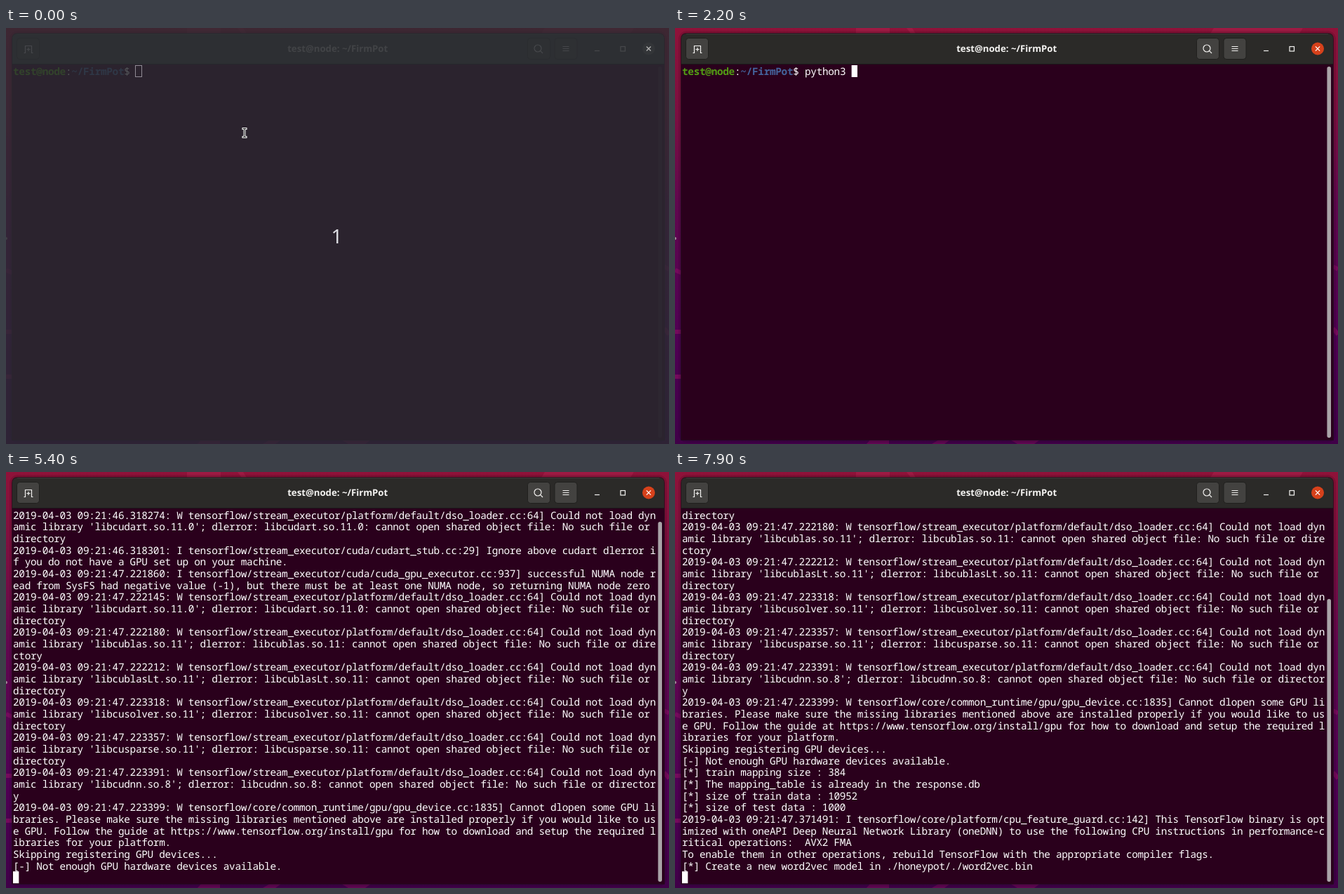
Animation, 945 px wide and 593 px high, one loop 8 s. Source, as an HTML page:

```html
<!DOCTYPE html>
<html lang="en">
<head>
<meta charset="utf-8">
<title>Terminal session</title>
<style>
  html, body { margin: 0; width: 100%; height: 100%; overflow: hidden; background: #2a001c; }
  svg { display: block; width: 945px; height: 593px; }
  text { white-space: pre; text-rendering: geometricPrecision; }
  .mono { font: 14.4px "Noto Sans Mono", "DejaVu Sans Mono", monospace; letter-spacing: -0.307px; fill: #fff; }
  .bold { font-weight: 700; }
  .title { font: 700 13.2px "Noto Sans", "Open Sans", sans-serif; text-anchor: middle; }
  .count { font: 500 28px "Noto Sans", "Open Sans", sans-serif; text-anchor: middle; fill: #dcdce2; }
  .icon { fill: none; stroke-width: 1.2; }
</style>
</head>
<body>
<svg viewBox="0 0 945 593">
  <defs>
    <linearGradient id="wall" x1="0" y1="0" x2="0" y2="1">
      <stop offset="0" stop-color="#8f1239"/>
      <stop offset=".22" stop-color="#7a0e41"/>
      <stop offset=".42" stop-color="#60074e"/>
      <stop offset=".75" stop-color="#4f0053"/>
      <stop offset="1" stop-color="#400048"/>
    </linearGradient>
    <clipPath id="pane"><rect x="9" y="54" width="929" height="533"/></clipPath>
  </defs>

  <rect width="945" height="593" fill="url(#wall)"/>
  <path d="M258 0H306V8H258ZM330 0H338L343 8H336ZM768 0H895L890 8H763Z" fill="#9d1a43"/>
  <path d="M273 593L278 587H305V593ZM366 593L376 587H392L384 593ZM478 587H520L512 593H488Z" fill="#600652"/>
  <path d="M0 345L9 349M0 433H9M0 497H9M938 428L945 437M938 340L945 344" stroke="#740a5c" stroke-width="6" fill="none"/>
  <circle cx="0" cy="300" r="2" fill="#a58a9b"/>

  <rect x="8" y="7" width="931" height="581" rx="9" fill="none" stroke="#000" stroke-width="6" opacity=".12"/>
  <path d="M8 588V16Q8 7 17 7H930Q939 7 939 16V588Z" fill="#1c0c18" opacity=".75"/>
  <rect x="9" y="51" width="929" height="536" fill="#2a001c"/>
  <rect id="idlePane" x="9" y="51" width="929" height="536" fill="#300122"/>
  <g id="activeBar"></g>
  <g id="idleBar"></g>

  <g clip-path="url(#pane)"><g id="lines"></g></g>
  <rect id="block" width="8.33" height="17"/>
  <rect id="thumb" x="929.4" width="5.6" rx="2.8" fill="#aaa4a8"/>

  <g id="countdown">
    <rect width="945" height="593" fill="#2a2c31" opacity=".8"/>
    <rect x="184.5" y="53.5" width="9" height="16" fill="none" stroke="#918b95"/>
    <path d="M913 26.5L919 32.5M919 26.5L913 32.5" stroke="#aaa" stroke-width="1.4"/>
    <text class="count" x="471.5" y="306.5">1</text>
  </g>
  <g id="pointer" fill="none" stroke-linecap="square">
    <path d="M338 143.5H342M340 143.5V155.5M338 155.5H342" stroke="#fff" stroke-width="3"/>
    <path d="M338 143.5H342M340 143.5V155.5M338 155.5H342" stroke="#111" stroke-width="1"/>
  </g>
</svg>

<script>
const LOOP = 8000, COLS = 110, ROWS = 32;
const LEFT = 10, TOP = 53, CELL_W = 8.3333, CELL_H = 16.667;
const PROMPT = 21;
const TITLE = 'test@node: ~/FirmPot';
const $ = id => document.getElementById(id);

const bar = c => {
  const button = x => `<rect x="${x}" y="14.5" width="32" height="30" rx="4" fill="${c.button}" stroke="${c.edge}"/>`;
  return `<path d="M9 51V16Q9 8 17 8H930Q938 8 938 16V51Z" fill="${c.bar}"/>
    <path d="M16 8.5H931" stroke="${c.shine}"/>
    <path d="M9 51.5H938" stroke="#1b1a19"/>
    ${button(15.5)}${button(743.5)}${button(782)}
    <text class="title" x="472.7" y="34" fill="${c.title}">${TITLE}</text>
    <g class="icon" stroke="${c.icon}">
      <path d="M25.5 35.5H27.5V25.5H36.5V35.5H38.5M29.5 30.5H34.5M32 28V33"/>
      <circle cx="758" cy="29" r="5"/><path d="M761.7 32.7L765 36"/>
      <path d="M793.5 26.5H802.5M793.5 29.5H802.5M793.5 32.5H802.5"/>
      <path d="M839 32.5H846"/>
      <rect x="876" y="26.5" width="6.5" height="6.5"/>
    </g>
    <circle cx="916" cy="29.5" r="9" fill="${c.close}"/>
    <path d="M912.9 26.4L919.1 32.6M919.1 26.4L912.9 32.6" stroke="#fff" stroke-width="1.3"/>`;
};
$('activeBar').innerHTML = bar({ bar: '#2b2a28', shine: '#3b3a37', button: '#434240', edge: '#20201e',
  title: '#f4f3f1', icon: '#f4f3f1', close: '#d6411b' });
$('idleBar').innerHTML = bar({ bar: '#3e3d3a', shine: '#484744', button: '#403f3c', edge: '#2c2b29',
  title: '#a3a19d', icon: '#b9b7b3', close: '#5a5956' });

// Log output, wrapped by the terminal at a fixed column
const log = (time, level, source, text) => `2019-04-03 09:21:${time}: ${level} tensorflow/${source}] ${text}`;
const missing = (time, lib) => log(time, 'W', 'stream_executor/platform/default/dso_loader.cc:64',
  `Could not load dynamic library '${lib}'; dlerror: ${lib}: cannot open shared object file: No such file or directory`);
const wrap = s => s.match(new RegExp(`.{1,${COLS}}`, 'g'));

const output = [
  missing('46.318274', 'libcudart.so.11.0'),
  log('46.318301', 'I', 'stream_executor/cuda/cudart_stub.cc:29',
    'Ignore above cudart dlerror if you do not have a GPU set up on your machine.'),
  log('47.221860', 'I', 'stream_executor/cuda/cuda_gpu_executor.cc:937',
    'successful NUMA node read from SysFS had negative value (-1), but there must be at least one NUMA node, so returning NUMA node zero'),
  missing('47.222145', 'libcudart.so.11.0'),
  missing('47.222180', 'libcublas.so.11'),
  missing('47.222212', 'libcublasLt.so.11'),
  missing('47.223318', 'libcusolver.so.11'),
  missing('47.223357', 'libcusparse.so.11'),
  missing('47.223391', 'libcudnn.so.8'),
  log('47.223399', 'W', 'core/common_runtime/gpu/gpu_device.cc:1835',
    'Cannot dlopen some GPU libraries. Please make sure the missing libraries mentioned above are installed properly if you would like to use GPU. Follow the guide at https://www.tensorflow.org/install/gpu for how to download and setup the required libraries for your platform.'),
  'Skipping registering GPU devices...',
  '[-] Not enough GPU hardware devices available.',
  '[*] train mapping size : 384',
  '[*] The mapping_table is already in the response.db',
  '[*] size of train data : 10952',
  '[*] size of test data : 1000',
  log('47.371491', 'I', 'core/platform/cpu_feature_guard.cc:142',
    'This TensorFlow binary is optimized with oneAPI Deep Neural Network Library (oneDNN) to use the following CPU instructions in performance-critical operations:  AVX2 FMA'),
  'To enable them in other operations, rebuild TensorFlow with the appropriate compiler flags.',
  '[*] Create a new word2vec model in ./honeypot/./word2vec.bin'
].flatMap(wrap);

const NS = 'http://www.w3.org/2000/svg';
function addText(row, col, text, fill, bold) {
  const el = document.createElementNS(NS, 'text');
  el.setAttribute('class', bold ? 'mono bold' : 'mono');
  el.setAttribute('x', LEFT + col * CELL_W);
  el.setAttribute('y', TOP + row * CELL_H + 13.6);
  if (fill) el.style.fill = fill;
  el.textContent = text;
  $('lines').append(el);
  return el;
}
addText(0, 0, 'test@node', '#539c14', true);
addText(0, 9, ':');
addText(0, 10, '~/FirmPot', '#44639c', true);
addText(0, 19, '$');
const command = addText(0, PROMPT, '');
const rows = output.map((s, i) => addText(i + 1, 0, s));

// Each list holds [start time, value]
const TYPED = [[0, ''], [1400, 'p'], [1500, 'py'], [1600, 'pyt'], [1800, 'pyth'], [1900, 'python'],
  [2200, 'python3 '], [2700, 'python3 l'], [2800, 'python3 lea'], [3200, 'python3 learner.py ']];
const PRINTED = [[0, 0], [4500, 6], [5400, 32], [5500, 36], [6000, 41]];
const IDLE = [[0, 1], [500, .6], [600, .25], [700, 0]];
const BLINK = [[0, 0], [400, 1], [3800, 0], [4300, 1], [4900, 0], [5400, 1], [6500, 0], [6700, 1], [7300, 0], [7900, 1]];
const at = (list, t) => list.filter(([start]) => start <= t).pop()[1];
const show = (el, on) => { el.style.display = on ? '' : 'none'; };

function render(t) {
  const typed = at(TYPED, t), count = at(PRINTED, t), idle = at(IDLE, t);
  const total = Math.max(ROWS, count + 1), scroll = total - ROWS;

  command.textContent = typed;
  rows.forEach((el, i) => show(el, i + 1 < count));
  $('lines').setAttribute('transform', `translate(0 ${-scroll * CELL_H})`);

  const col = count ? 0 : PROMPT + typed.length;
  $('block').setAttribute('x', LEFT + col * CELL_W);
  $('block').setAttribute('y', TOP + (count - scroll) * CELL_H - (count ? .4 : 0));
  $('block').setAttribute('fill', idle === 1 ? '#d5ccd2' : '#fff');
  show($('block'), at(BLINK, t));

  $('thumb').setAttribute('y', 55 + 529 * scroll / total);
  $('thumb').setAttribute('height', 529 * ROWS / total);
  $('thumb').style.opacity = 1 - .9 * idle;
  $('idleBar').style.opacity = $('idlePane').style.opacity = idle;
  show($('countdown'), t < 400);
  show($('pointer'), t < 1200);
}

const begin = performance.now();
function tick() {
  render((performance.now() - begin) % LOOP);
  requestAnimationFrame(tick);
}
tick();
</script>
</body>
</html>
```
